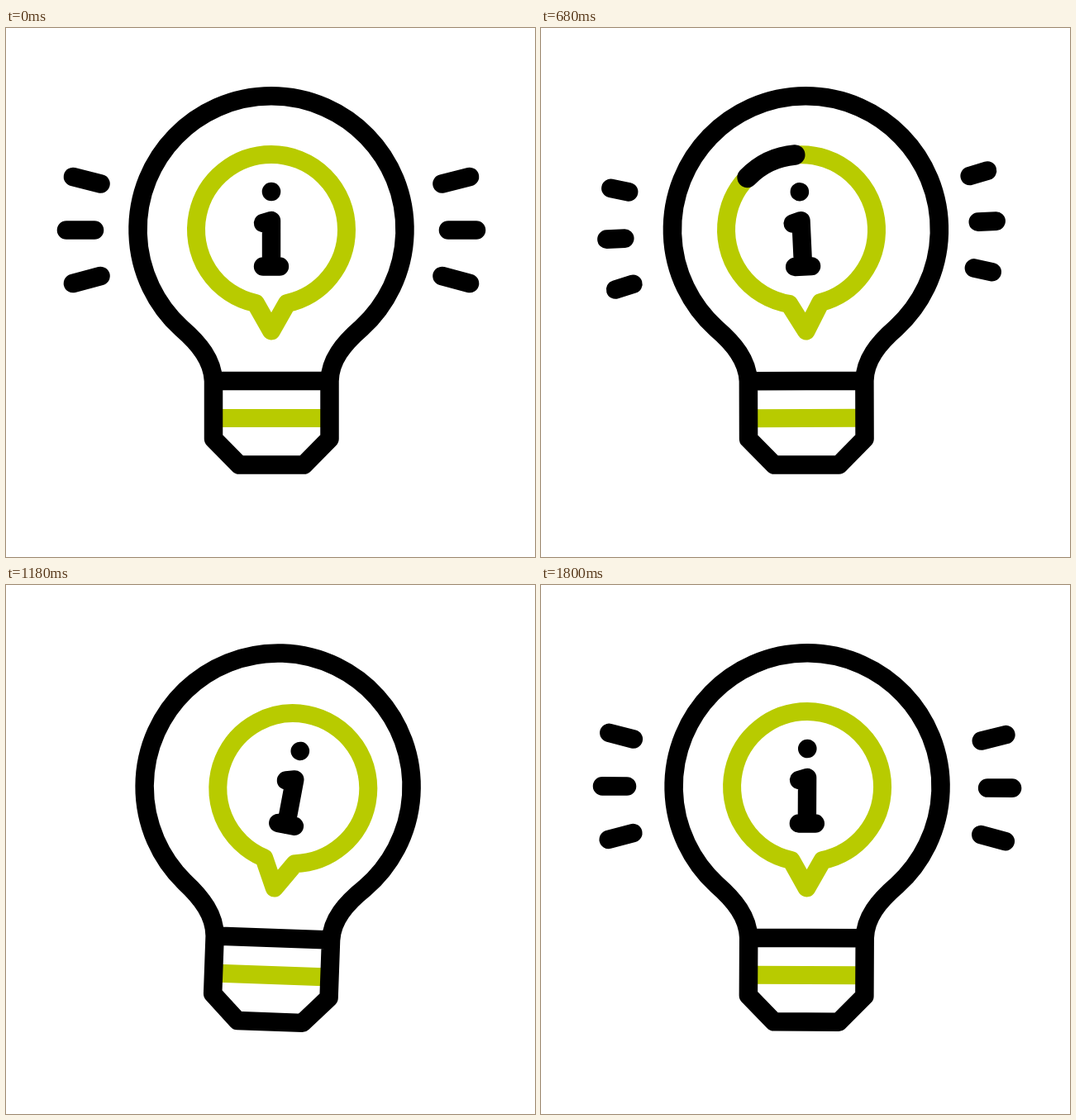
An HTML page with a canvas for the animation above (1820 ms loop, 640 px wide and 640 px high).

```html
<!DOCTYPE html>
<html lang="en">
<head>
<meta charset="utf-8">
<title>Idea bulb</title>
<style>
html, body { margin: 0; width: 100%; height: 100%; overflow: hidden; background: #fff; }
canvas { display: block; width: 640px; height: 640px; }
</style>
</head>
<body>
<canvas id="stage" width="640" height="640"></canvas>
<script>
const ctx = document.getElementById('stage').getContext('2d');
const LOOP = 1820, STEP = 20, BLACK = '#000', GREEN = '#b8cb00';
const CX = 321, CY = 244;

// [time, degrees], eased between neighbours
const BULB_SWING = [[660, 0], [920, -8.8], [1370, 8.8], [1850, 0]];
const BUBBLE_SWING = [[560, 0], [880, -8], [1210, 9], [1760, 0]];

const NECK = 19, RING = 91, TIP_Y = 366.5;
const NECK_ANGLE = Math.asin(NECK / RING);
const NECK_Y = CY + RING * Math.cos(NECK_ANGLE);
const RING_LENGTH = 2 * (RING * (Math.PI - NECK_ANGLE) + Math.hypot(NECK, TIP_Y - NECK_Y));

// outer x, outer y, inner x, inner y, measured from the ring centre
const RAYS = [[240, -64, 206.5, -55.5], [248, 0.5, 214, 0.5], [240, 65, 206.5, 56]];

const mix = (a, b, k) => a + (b - a) * k;
const span = (t, a, b) => Math.min(1, Math.max(0, (t - a) / (b - a)));
const smooth = k => k * k * (3 - 2 * k);

function swing(keys, t) {
  let angle = keys[0][1];
  for (let i = 1; i < keys.length; i++) {
    if (t >= keys[i - 1][0]) {
      angle = mix(keys[i - 1][1], keys[i][1], smooth(span(t, keys[i - 1][0], keys[i][0])));
    }
  }
  return angle;
}

// cubic bezier (1/6, 1/6, 2/3, 1): steady start, soft stop
function softStop(x) {
  if (x <= 0 || x >= 1) return x <= 0 ? 0 : 1;
  const curve = (s, p, q) => 3 * p * s * (1 - s) ** 2 + 3 * q * s * s * (1 - s) + s ** 3;
  let lo = 0, hi = 1;
  for (let i = 0; i < 24; i++) {
    const mid = (lo + hi) / 2;
    if (curve(mid, 1 / 6, 2 / 3) < x) lo = mid; else hi = mid;
  }
  return curve(lo, 1 / 6, 1);
}

function turn(y, degrees) {
  ctx.translate(CX, y);
  ctx.rotate(degrees * Math.PI / 180);
  ctx.translate(-CX, -y);
}

function stroke(color, width, path) {
  ctx.strokeStyle = color;
  ctx.lineWidth = width;
  ctx.stroke(path);
}

const band = new Path2D('M258 472H384');
const bulb = new Path2D(
  'M251 427C250 402 234 382 212 363A161.5 161.5 0 1 1 430 363C408 382 392 402 391.5 427' +
  'V497L360.5 528.5H282L251 497ZH391.5');
const letter = new Path2D('M311 236L321 233V288.5M311 288.5H331');

const ring = new Path2D();
ring.arc(CX, CY, RING, -Math.PI / 2, Math.PI / 2 - NECK_ANGLE);
ring.lineTo(CX, TIP_Y);
ring.lineTo(CX - NECK, NECK_Y);
ring.arc(CX, CY, RING, Math.PI / 2 + NECK_ANGLE, Math.PI * 1.5);

function drawRays(t) {
  const shrink = span(t, 580, 860), grow = span(t, 1580, 1830);
  if (shrink === 1 && grow === 0) return;
  const from = grow > 0 ? 0 : shrink;
  const to = grow > 0 && t > 0 ? grow : 1;
  const path = new Path2D();
  for (const side of [-1, 1]) {
    for (const [ox, oy, ix, iy] of RAYS) {
      path.moveTo(CX + side * mix(ox, ix, from), CY + mix(oy, iy, from));
      path.lineTo(CX + side * mix(ox, ix, to), CY + mix(oy, iy, to));
    }
  }
  stroke(BLACK, 22.6, path);
}

function drawTracer(t) {
  const head = softStop(span(t, 0, 720)) * RING_LENGTH;
  const tail = softStop(span(t, 320, 800)) * RING_LENGTH;
  if (head - tail < 0.1) return;
  ctx.setLineDash([head - tail, RING_LENGTH * 2]);
  ctx.lineDashOffset = -tail;
  stroke(BLACK, 24.5, ring);
  ctx.setLineDash([]);
}

function draw(t) {
  ctx.fillStyle = '#fff';
  ctx.fillRect(0, 0, 640, 640);
  ctx.save();
  ctx.lineCap = ctx.lineJoin = 'round';

  turn(472, swing(BULB_SWING, t));
  stroke(GREEN, 22, band);
  stroke(BLACK, 22.5, bulb);

  turn(366, swing(BUBBLE_SWING, t));
  drawRays(t);
  stroke(GREEN, 22, ring);
  drawTracer(t);
  stroke(BLACK, 22.4, letter);
  ctx.fillStyle = BLACK;
  ctx.beginPath();
  ctx.arc(CX, 198, 11.3, 0, Math.PI * 2);
  ctx.fill();
  ctx.restore();
}

function tick() {
  const t = performance.now() % LOOP;
  draw(t - t % STEP);
  requestAnimationFrame(tick);
}
tick();
</script>
</body>
</html>
```
